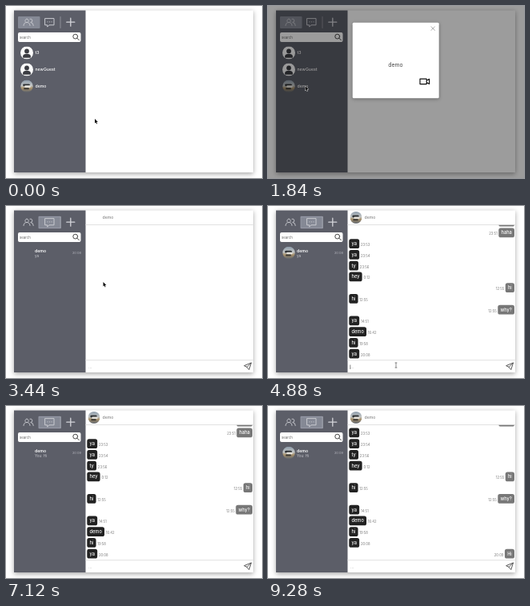
An HTML page with a canvas that plays this animation: 320 by 215 pixels, repeating every 9.36 s.

```html
<!DOCTYPE html>
<html lang="en">
<head>
<meta charset="utf-8">
<title>Chat client</title>
<style>
html, body { margin: 0; width: 320px; height: 215px; overflow: hidden; background: #fff; }
canvas { display: block; width: 320px; height: 215px; }
</style>
</head>
<body>
<canvas id="stage"></canvas>
<script>
const LOOP = 9360, STEP = 80;
const OPEN = 1840, CHAT = 3440, FOCUS = 4480, SEND = 7120;
const FRIEND = 'demo', GUEST = 'newGuest';
const SIDE = '#5c5e68', PALE = '#c9cad0', DARK = '#3a3c44';

const canvas = document.getElementById('stage');
const c = canvas.getContext('2d');
const dpr = window.devicePixelRatio || 1;
canvas.width = 320 * dpr;
canvas.height = 215 * dpr;

// text, time, sent by me
const messages = [
  ['haha', '23:51', 1], ['haha', '23:51', 1], ['ya', '23:53'], ['ya', '23:54'],
  ['ty', '23:56'], ['hey', '0:12'], ['hi', '12:55', 1], ['hi', '12:55'],
  ['why?', '12:55', 1], ['ya', '14:51'], [FRIEND, '16:42'], ['hi', '19:58'],
  ['ya', '20:08'], ['Hi', '20:09', 1]
];

// time, x, y
const route = [
  [0, 111, 141], [80, 110, 140], [560, 46, 99.5], [1280, 46, 99.5], [1520, 46.5, 100],
  [1840, 46.5, 100], [2720, 121.5, 95], [3680, 121.5, 95], [4480, 160, 199]
];

const clamp = v => Math.max(0, Math.min(1, v));
const ease = v => { v = clamp(v); return v * v * (3 - 2 * v); };

function pointerAt(t) {
  let i = 0;
  while (i < route.length - 2 && t > route[i + 1][0]) i++;
  const [t0, x0, y0] = route[i], [t1, x1, y1] = route[i + 1];
  const k = ease((t - t0) / (t1 - t0));
  return [x0 + (x1 - x0) * k, y0 + (y1 - y0) * k];
}

function text(s, x, y, size, color, weight = 400, align = 'left') {
  c.font = `${weight} ${size}px Inter, "Liberation Sans", sans-serif`;
  c.textAlign = align;
  c.fillStyle = color;
  c.fillText(s, x, y);
}

function rect(x, y, w, h, color, r = 0) {
  c.fillStyle = color;
  c.beginPath();
  c.roundRect(x, y, w, h, r);
  c.fill();
}

function disc(x, y, r, color) {
  c.fillStyle = color;
  c.beginPath();
  c.arc(x, y, r, 0, 7);
  c.fill();
}

function line(d, color, width = 1, x = 0, y = 0) {
  c.save();
  c.translate(x, y);
  c.strokeStyle = color;
  c.lineWidth = width;
  c.lineJoin = c.lineCap = 'round';
  c.stroke(new Path2D(d));
  c.restore();
}

function inCircle(x, y, r, draw) {
  c.save();
  c.beginPath();
  c.arc(x, y, r, 0, 7);
  c.clip();
  c.translate(x, y);
  c.scale(r / 8, r / 8);
  draw();
  c.restore();
}

function person(x, y) {
  inCircle(x, y, 8, () => {
    rect(-8, -8, 16, 16, '#fafafa');
    disc(0, -2, 2.9, '#3b3c42');
    rect(-5, 1.6, 10, 4.6, '#3b3c42', [4, 4, 1, 1]);
  });
}

function photo(x, y, r) {
  inCircle(x, y, r, () => {
    const g = c.createLinearGradient(0, -8, 0, 8);
    g.addColorStop(0, '#8d9cab');
    g.addColorStop(.45, '#c2c5c4');
    g.addColorStop(.65, '#a8916b');
    g.addColorStop(1, '#5b626b');
    c.fillStyle = g;
    c.fillRect(-8, -8, 16, 16);
    rect(-5, -3, 9, 3, '#2f3235', 1.5);
    rect(-3, -1, 8, 3, '#e4e1da', 1.5);
    rect(-4, 2, 7, 2, '#393733', 1);
  });
}

function sidebar(t) {
  const chat = t >= CHAT;
  rect(10, 5.5, 89.5, 202.5, SIDE);
  rect(chat ? 41 : 15, 13, 27.5, 15, '#858995', 1);
  if (chat) line('M41.3 13.3h27v14.4h-27z', '#aaaeba', .6);

  // tabs
  line('M26 16.2a2.2 2.2 0 1 0 .1 0M22 24.5q.2-4 4-4t4 4M30 16.2a2.2 2.2 0 1 1 .7 4.3q3.4 .2 3.6 4', PALE, .9);
  line('M49 15.6h11v8.2h-6l-2.3 2.2v-2.2h-2.7z', PALE, 1);
  [52, 54.5, 57].forEach(x => disc(x, 19.8, .6, PALE));
  line('M68 13.5v14', '#a2a4ac', .7);
  line('M80.8 15.2v10M75.8 20.2h10', '#d4d5da', 1.3);

  // search
  rect(15, 33, 78.5, 12, '#fff', 2);
  text('search', 17, 40.6, 4.3, '#666');
  line('M89.6 38.1a2.9 2.9 0 1 1-5.8 0a2.9 2.9 0 1 1 5.8 0M88.9 40.2l2.4 2.5', '#333', .9);

  if (!chat) {
    person(26, 58.5);
    person(26, 79.5);
    photo(26, 100.3, 7.8);
    ['t3', GUEST, FRIEND].forEach((s, i) => text(s, 36.5, 60.3 + 21 * i, 5.2, '#fff', 500));
    return;
  }
  const sent = t >= SEND;
  const loading = t < CHAT + STEP || (sent && t < SEND + STEP);
  if (!loading) photo(26, 58.6, 7.8);
  text(FRIEND, 36, 57.5, 5.2, '#fff', 600);
  text(sent ? 'You: Hi' : 'ya', 36, 63.8, 4.6, '#c3c4ca');
  text(sent ? '20:09' : '20:08', 94, 60.2, 4, '#b4b6be', 400, 'right');
}

function bubble([s, time, mine], y) {
  c.font = '500 5.7px Inter, "Liberation Sans", sans-serif';
  const w = c.measureText(s).width + 6.4;
  const x = mine ? 308 - w : 101.3;
  rect(x, y - 5.9, w, 11.8, mine ? '#777' : '#222', 2.6);
  text(s, x + 3.2, y + 1.8, 5.7, '#fff', 500);
  text(time, mine ? x - 1.5 : x + w + 1.8, y + 3, 4.2, '#777', 400, mine ? 'right' : 'left');
}

function conversation(t) {
  if (t >= CHAT + STEP) {
    const arrived = t >= SEND + STEP;
    const scroll = arrived ? 13.75 * ease((t - SEND - STEP + 40) / 280) : 0;
    c.save();
    c.beginPath();
    c.rect(99.5, 23.5, 209.5, 169);
    c.clip();
    messages.forEach((m, i) => {
      if (i < messages.length - 1 || arrived) bubble(m, 19.7 + 13.75 * i - scroll);
    });
    c.restore();
    photo(110, 14.4, 7.5);
  }
  text(FRIEND, 120.5, 16.2, 5.2, '#777');
  line('M99.5 23.5h209M99.5 192.7h209', '#d5d5d5', .7);

  // input
  const typed = t < SEND ? 'Hi'.slice(0, (t >= 5680) + (t >= 6080)) : '';
  text(typed || '...', 103, 203.3, 5, typed ? '#333' : '#888');
  const blink = t >= SEND ? Math.floor((t - SEND) / 500) % 2 === 1
    : t >= FOCUS && Math.floor((t - FOCUS) / 500) % 2 === 0;
  if (blink) {
    const x = 102.6 + (typed ? c.measureText(typed).width + .8 : 0);
    rect(x, 198.5, .6, 5.5, '#333');
  }
  line('M298 199.5l8.5-3.5l-2.7 8.6l-2.7-3.2zM301.1 201.4l5.4-5.4', '#444', .9);
}

function modal(t, [px, py]) {
  rect(0, 0, 320, 215, 'rgba(0,0,0,.39)');
  c.save();
  c.shadowColor = 'rgba(0,0,0,.35)';
  c.shadowBlur = 4 * dpr;
  c.shadowOffsetY = dpr;
  rect(105.7, 20.7, 108, 94.5, '#fff', 1.5);
  c.restore();
  line('M204 25.8l4.4 4.6M208.4 25.8l-4.4 4.6', '#888', .7);
  text(FRIEND, 159.5, 76.4, 6.9, '#444', 400, 'center');
  line('M190 91.2h8.2v6.4h-8.2zM198.2 93.3l3.4-2v6.2l-3.4-2', '#111', 1.2);
  if (t < OPEN + STEP) return;

  photo(159.3, 51, 12.2);
  if (Math.hypot(px - 123.5, py - 94) < 9.5) disc(123.5, 94, 9.6, '#c8cce2');
  line('M118.5 90h8v6h-5l-2 1.6v-1.6h-1zM121 92h3.5M121 94h3.5M126.8 92h1.8v6h-1v1.6l-2-1.6h-4', DARK, .9);
  line('M155 89.3l2-.9l1.8 3l-1.3 1.3q.9 2.9 3.5 4.3l1.5-1.2l2.6 2l-1.2 2q-2 .9-5-1.6q-4.6-4-4.3-7.5zM160.5 90.7q2 .6 2.4 2.7M161 88q4 .7 4.7 5', DARK, .9);
}

function pointer(t, [x, y]) {
  if (t >= 5680) return;
  if (t >= 4320) {
    line('M-1 0h2M0 0v6M-1 6h2', '#444', .6, x, y - 3);
    return;
  }
  const hover = t > 480 && t < OPEN || t > 2560 && t < CHAT;
  const shape = hover
    ? 'M0 0q1-.7 1.3.3v2.2l2.6.7q.6.3.4 1.2l-.7 2.6h-2.9l-2-2.7q.2-.8 1.3.1z'
    : 'M0 0v5.6l1.3-1.1l.9 2l.9-.4l-.9-2h1.7z';
  c.save();
  c.translate(x, y);
  const path = new Path2D(shape);
  c.strokeStyle = hover ? '#222' : '#fff';
  c.lineWidth = .8;
  c.stroke(path);
  c.fillStyle = hover ? '#fff' : '#111';
  c.fill(path);
  c.restore();
}

function draw(t) {
  c.setTransform(dpr, 0, 0, dpr, 0, 0);
  rect(0, 0, 320, 215, '#fff');
  c.save();
  c.shadowColor = 'rgba(0,0,0,.35)';
  c.shadowBlur = 6 * dpr;
  c.shadowOffsetY = 1.5 * dpr;
  rect(10, 5.5, 299, 202.5, '#fff');
  c.restore();
  const spot = pointerAt(t);
  sidebar(t);
  if (t >= CHAT) conversation(t);
  else if (t >= OPEN) modal(t, spot);
  pointer(t, spot);
}

const start = performance.now();
function tick() {
  const t = (performance.now() - start) % LOOP;
  draw(Math.floor(t / STEP) * STEP);
  requestAnimationFrame(tick);
}
tick();
</script>
</body>
</html>
```
